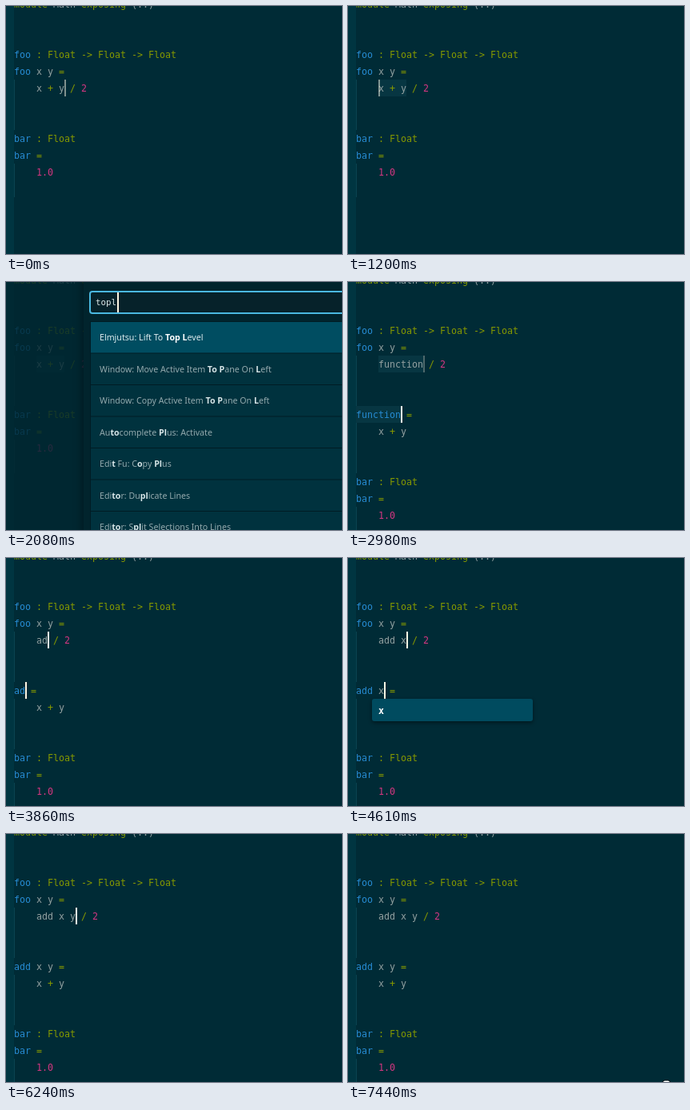
An HTML page with a canvas that plays this animation: 420 by 310 pixels, repeating every 7.54 s.

```html
<!DOCTYPE html>
<html>
<head>
<meta charset="utf-8">
<style>
html, body { margin: 0; overflow: hidden; background: #002b36; }
canvas { display: block; }
</style>
</head>
<body>
<canvas id="stage" width="420" height="310"></canvas>
<script>
const ctx = document.getElementById('stage').getContext('2d');
const LOOP = 7540, CHAR = 7, LINE = 21, LEFT = 10, TOP = -13;
const MONO = '"DejaVu Sans Mono", monospace', SANS = '"Noto Sans", sans-serif';
const CREAM = '#fdf6e3';

// Asterisks enclose the letters matched by the query.
const commands = [
  'Elmjutsu: Lift To *Top L*evel',
  'Window: Move Active Item *To P*ane On *L*eft',
  'Window: Copy Active Item *To P*ane On *L*eft',
  'Au*to*complete *Pl*us: Activate',
  'Edi*t* Fu: C*o*py *Pl*us',
  'Edi*to*r: Du*pl*icate Lines',
  'Edi*to*r: S*pl*it Selections Into Lines'
];

// Each step changes part of the state. carets: opacity in the call, in the definition.
const start = { name: null, carets: [.5], from: 9, selected: false, query: null, blink: 1, popup: null, mouse: false };
const steps = [
  [150, { carets: [1] }],
  [300, { from: 8 }],
  [450, { from: 6 }],
  [600, { from: 4 }],
  [1050, { carets: [.75] }],
  [1200, { carets: [.5] }],
  [1350, { query: '', carets: [0] }],
  [1500, { blink: .5 }],
  [1640, { query: 't', blink: 1 }],
  [1790, { query: 'to' }],
  [1930, { query: 'top' }],
  [2080, { query: 'topl' }],
  [2530, { query: null, carets: [1] }],
  [2680, { name: 'function', selected: true, carets: [1, 1] }],
  [2830, { carets: [.7, 1] }],
  [2980, { carets: [.3, 1] }],
  [3120, { carets: [0, .6] }],
  [3270, { carets: [0, .2] }],
  [3420, { carets: [.5, 0] }],
  [3560, { carets: [1, .5] }],
  [3710, { name: 'a', selected: false, carets: [1, 1] }],
  [3860, { name: 'ad' }],
  [4010, { name: 'add' }],
  [4160, { name: 'add ' }],
  [4610, { name: 'add x', popup: 'x' }],
  [4750, { name: 'add x ', popup: null }],
  [5050, { name: 'add x y', popup: 'y' }],
  [5500, { popup: null }],
  [5650, { carets: [.5, .5] }],
  [5800, { carets: [0, 0] }],
  [5940, { carets: [.5, .5] }],
  [6090, { carets: [.5] }],
  [6240, { carets: [1] }],
  [6390, { carets: [.5] }],
  [6540, { carets: [0] }],
  [6690, { carets: [.5] }],
  [6840, { carets: [1] }],
  [6990, { carets: [.5] }],
  [7140, { carets: [0] }],
  [7290, { carets: [.3] }],
  [7440, { carets: [0], mouse: true }]
];

const stateAt = t => Object.assign({}, start, ...steps.filter(s => s[0] <= t).map(s => s[1]));
const colX = col => LEFT + col * CHAR;
const rowY = row => TOP + row * LINE;

function rect(x, y, w, h, color) {
  ctx.fillStyle = color;
  ctx.fillRect(x, y, w, h);
}

function rounded(x, y, w, h, r, color) {
  ctx.fillStyle = color;
  ctx.beginPath();
  ctx.roundRect(x, y, w, h, r);
  ctx.fill();
}

function shadowed(blur, dy, draw) {
  ctx.save();
  ctx.shadowColor = 'rgba(0,0,0,.45)';
  ctx.shadowBlur = blur;
  ctx.shadowOffsetY = dy;
  draw();
  ctx.restore();
}

function write(text, x, y, color, font) {
  ctx.font = font;
  ctx.fillStyle = color;
  ctx.fillText(text, x, y);
}

function tokenColor(word, col) {
  if (/^\d/.test(word)) return '#d33682';
  if (/^(module|exposing|Float)$/.test(word)) return '#859900';
  if (col === 0) return '#268bd2';
  return /^[a-zA-Z(]/.test(word) ? '#93a1a1' : '#859900';
}

function codeLine(row, text) {
  for (const { 0: word, index } of text.matchAll(/\S+/g))
    write(word, colX(index), rowY(row) + 15, tokenColor(word, index), '11.63px ' + MONO);
}

function caret(row, col, alpha) {
  ctx.globalAlpha = alpha;
  rect(colX(col), rowY(row), 2, LINE, CREAM);
  ctx.globalAlpha = 1;
}

const selection = (row, from, to) => rect(colX(from), rowY(row), (to - from) * CHAR, LINE, '#073642');
const guide = (row, count) => rect(LEFT, rowY(row), 1, count * LINE, '#0a4350');

function drawEditor({ name, carets, from, selected }) {
  const bar = name ? 12 : 8;
  rect(0, 0, 420, 310, '#002b36');
  rect(0, 0, LEFT, 310, '#003541');
  guide(5, 3);
  guide(bar + 2, 2);
  if (name) guide(9, 3);
  else selection(5, from, 9);
  if (selected) {
    selection(5, 4, 4 + name.length);
    selection(8, 0, name.length);
  }

  codeLine(0, 'module Math exposing (..)');
  codeLine(3, 'foo : Float -> Float -> Float');
  codeLine(4, 'foo x y =');
  codeLine(5, `    ${name || 'x + y'} / 2`);
  if (name) {
    codeLine(8, name + ' =');
    codeLine(9, '    x + y');
  }
  codeLine(bar, 'bar : Float');
  codeLine(bar + 1, 'bar =');
  codeLine(bar + 2, '    1.0');

  caret(5, name ? 4 + name.length : from, carets[0]);
  if (carets.length > 1) caret(8, name.length, carets[1]);
}

function drawPopup(word, col) {
  shadowed(5, 2, () => rounded(colX(col) - 8, 176, 201, 28, 3, '#004b5f'));
  write(word, colX(col), 195, '#fff', 'bold 11.63px ' + MONO);
}

function drawCommand(label, i, matches) {
  const y = 50 + i * 39.5, active = i === 0;
  rect(106, y, 314, 38.5, active ? '#004d61' : '#00323e');
  let x = 117, bold = false;
  const run = (text, strong) => {
    const color = strong ? (active ? '#fff' : '#d8e6e8') : (active ? '#dcebee' : '#93a9ad');
    write(text, x, y + 23, color, (strong ? 'bold ' : '') + '10.65px ' + SANS);
    x += ctx.measureText(text).width;
  };
  for (const part of label.split('*')) {
    const cut = bold ? part.slice(0, matches).trimEnd().length + (part[matches - 1] === ' ' ? 2 : 0) : 0;
    run(part.slice(0, cut), true);
    run(part.slice(cut), false);
    if (bold) matches = Math.max(0, matches - part.replace(' ', '').length);
    bold = !bold;
  }
}

function drawPalette(query, blink) {
  rect(0, 0, 420, 310, 'rgba(0,38,48,.82)');
  shadowed(12, 0, () => rect(97, -20, 340, 350, '#01242d'));
  rounded(104, 11, 340, 29, 4, '#4ab8e0');
  rounded(106, 13, 336, 25, 2, '#06222a');
  write(query, 112, 29, '#dbe6e6', '10.8px ' + MONO);
  ctx.globalAlpha = blink;
  rect(113 + query.length * 6.5, 13, 2, 25, CREAM);
  ctx.globalAlpha = 1;
  rect(105, 49, 315, 261, '#001c24');
  commands.forEach((label, i) => drawCommand(label, i, query.length));
}

function drawMouse() {
  rounded(393, 307.5, 10, 8, 3, '#001015');
  rounded(394, 308.5, 8, 8, 2, '#fff');
}

function frame() {
  const state = stateAt(performance.now() % LOOP);
  drawEditor(state);
  if (state.popup) drawPopup(state.popup, state.name.length - 1);
  if (state.query !== null) drawPalette(state.query, state.blink);
  if (state.mouse) drawMouse();
  requestAnimationFrame(frame);
}
frame();
</script>
</body>
</html>
```
